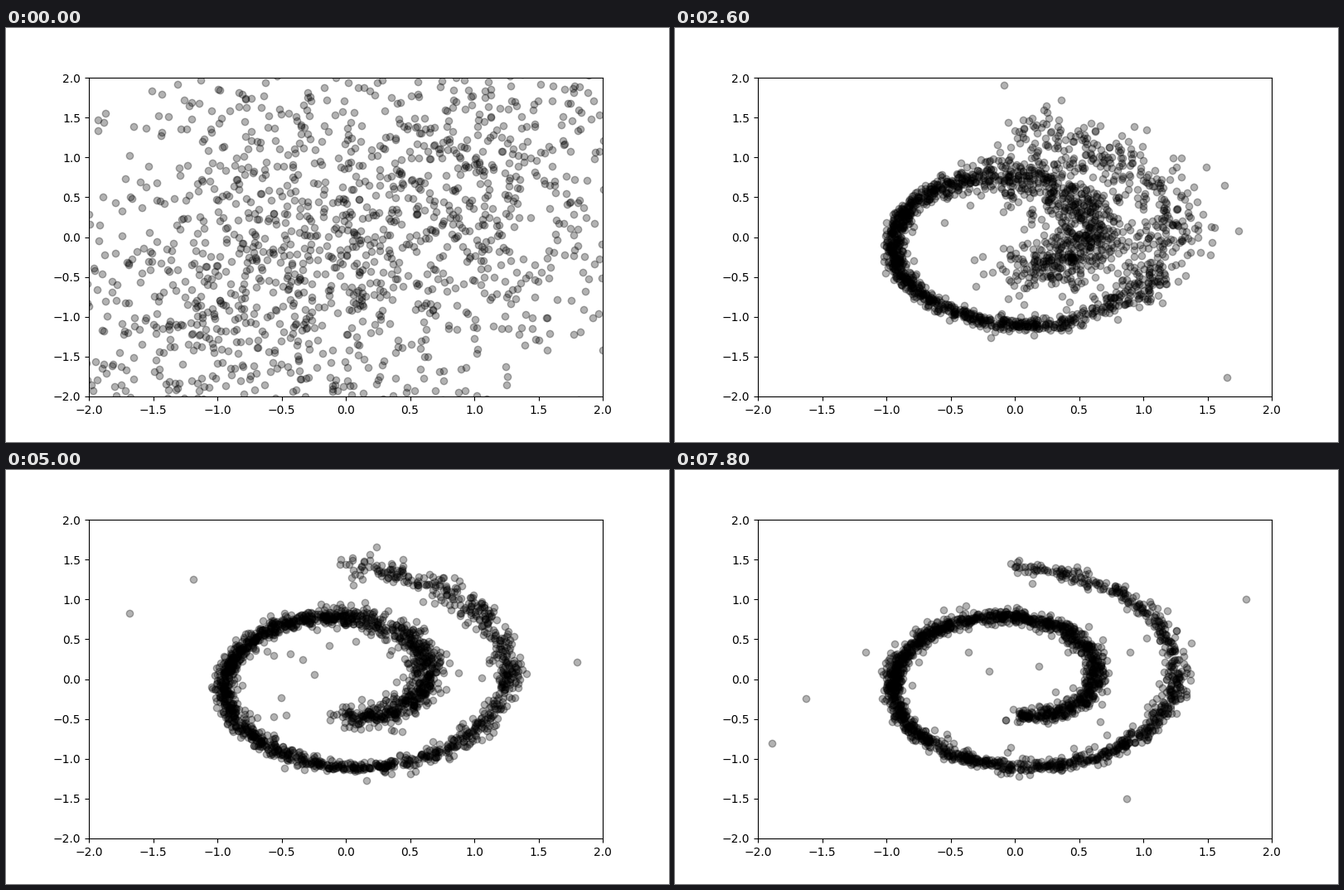
Write a matplotlib script that moves like this. It is 800 px wide and 500 px high and loops after 8000 ms.

```python
import numpy as np
import matplotlib.pyplot as plt
from matplotlib.animation import FuncAnimation

COUNT = 2000
FRAMES = 40
STEP = 200  # ms
SETTLE = 1.6  # seconds until the wide cloud has collapsed
CORE = np.array([[.4], [.15]])  # the unsettled arms blur around this point


def smoothstep(x):
    x = np.clip(x, 0, 1)
    return x * x * (3 - 2 * x)


def fade(sec, tau):
    return np.exp(-max(0, sec - SETTLE) / tau)


def roll(rng, sec):
    # angles along the spiral, a little denser in the middle of its length
    u = rng.random(COUNT)
    deg = -90 + 540 * (u + .045 * np.sin(2 * np.pi * u))
    angle = np.radians(deg)
    radius = (angle + 2 * np.pi) / 10

    # a few points are still lost in the hollow
    lost = rng.random(COUNT) < .02 * fade(sec, 2.5)
    radius[lost] *= rng.uniform(.2, 1, lost.sum())
    pts = radius * np.array([np.cos(angle), np.sin(angle)])

    # the left side is sharp from the start, both ends settle later
    unsettled = smoothstep((abs(deg - 215) - 60) / 100)
    pts[1] += .3 * fade(sec, .9) * np.exp(-((deg - 80) / 35) ** 2)
    pull = np.where(deg < 180, fade(sec, 1.3), fade(sec, .7))
    pts += (CORE - pts) * unsettled * pull * .9 * rng.random(COUNT) ** 1.5

    blur = .042 + .2 * unsettled * fade(sec, 1.8)
    return pts + blur * rng.standard_t(8, (2, COUNT)) * .87


def cloud(rng):
    a, b = rng.standard_normal((2, COUNT))
    return np.array([1.4 * a, 1.7 * (.45 * a + .89 * b) - .05])


def strays(rng, sec):
    count = int(16 * (1 - fade(sec, 2)))
    return rng.standard_normal((2, count)) * [[1.2], [.95]]


def points(frame):
    rng = np.random.default_rng(1000 + frame)
    sec = frame * STEP / 1000
    spread = max(0, 1 - sec / SETTLE) ** 1.6
    pts = (1 - spread) * roll(rng, sec) + spread * cloud(rng)
    return np.hstack([pts, strays(rng, sec)])


fig, ax = plt.subplots(figsize=(8, 5), dpi=100)
dots, = ax.plot([], [], "o", color="black", alpha=.3)
ax.set_xlim(-2, 2)
ax.set_ylim(-2, 2)


def draw(frame):
    dots.set_data(*points(frame))
    return dots,


anim = FuncAnimation(fig, draw, frames=FRAMES, interval=STEP, repeat=True)
plt.show()
```
